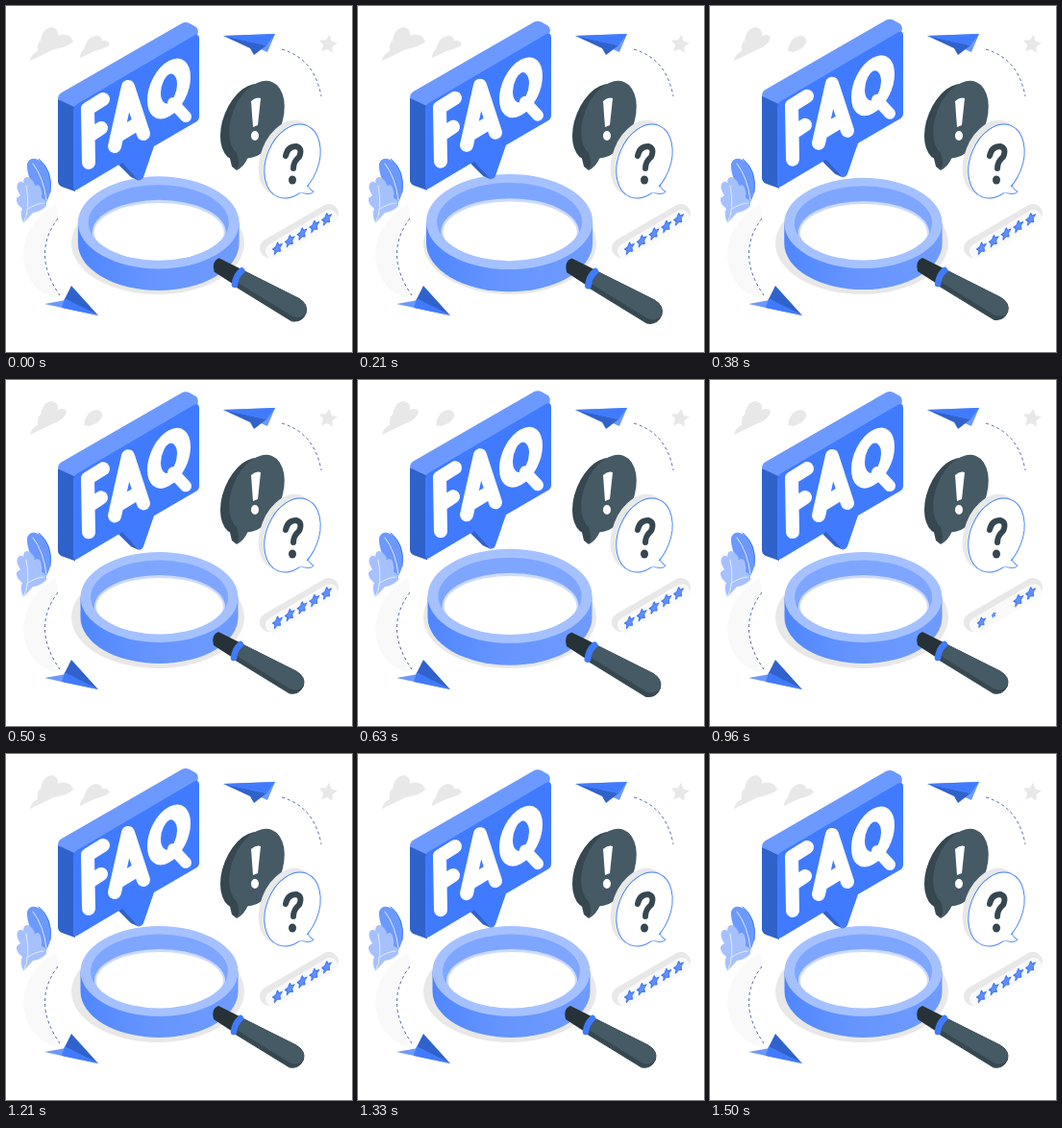
An HTML page for the animation above (1540 ms loop, 360 by 360 pixels).

```html
<!DOCTYPE html>
<html lang="en">
<head>
<meta charset="utf-8">
<title>FAQ</title>
<style>
html, body { margin: 0; width: 100%; height: 100%; overflow: hidden; background: #fff }
svg { display: block; width: 100vw; height: 100vh }
.blue { fill: #407bff } .light { fill: #6c99ff } .deep { fill: #3062cc }
.pale { fill: #a5c1ff } .gray { fill: #e8e8e8 } .white { fill: #fff }
.slate { fill: #455a64 } .dark { fill: #37474f } .ink { fill: #263238 }
.line { fill: none; stroke-linecap: round; stroke-linejoin: round }
.dash { fill: none; stroke: #3d5590; stroke-width: .9; stroke-dasharray: 3 3 }
</style>
</head>
<body>
<svg viewBox="0 0 360 360">
  <defs>
    <clipPath id="rim"><ellipse cx="159.5" cy="226" rx="71.5" ry="38.5"/></clipPath>
    <linearGradient id="wall">
      <stop stop-color="#4f86ff"/><stop offset=".45" stop-color="#6695ff"/><stop offset="1" stop-color="#6f9bff"/>
    </linearGradient>
  </defs>

  <!-- clouds and backdrop star -->
  <g class="gray">
    <path d="M25 57Q26 50 33 47Q32 39 36 36Q38 23 48 22Q55 24 54 31Q61 28 63 33Q61 41 50 45Z"/>
    <path d="M81 47Q83 33 93 31Q101 31 100 38Q97 45 87 48Z"/>
    <g id="tails">
      <path d="M54 31Q66 27 70 37Q66 42 50 45Z"/>
      <path d="M77 54Q77 48 82 44L99 36Q106 35 108 40Q104 44 94 46Z"/>
    </g>
    <path id="badge"/>
  </g>

  <!-- paper planes -->
  <path d="M52 206Q18 226 18 262Q22 295 50 304L56 301Q26 258 54 221Z" fill="#f9f9f9"/>
  <path class="dash" d="M287 45Q321 55 328 94M54 221Q26 258 56 301"/>
  <path class="light" d="M226 31L280 29L272 48L258 42Z"/>
  <path class="deep" d="M226 31L271 41L258 51L254 44Z"/>
  <path class="blue" d="M226 31L280 29L271 41Z"/>
  <path class="light" d="M96 322L62 306L40 310Z"/>
  <path class="deep" d="M96 322L68 291L61 305Z"/>
  <path class="blue" d="M96 322L61 304L58 314Z"/>

  <!-- leaves -->
  <path class="light" d="M42 204C30 196 21 176 22 164C25 155 36 158 42 168C49 180 48 194 42 204Z"/>
  <path class="line" d="M42 202Q39 178 28 164" stroke="#dbe6ff"/>
  <path class="line" d="M34 159Q49 171 46 194" stroke="#407bff"/>
  <path class="pale" d="M18 226Q14 216 17 211Q10 206 11 200L15 197Q10 190 12 185Q15 181 18 184Q18 177 23 178Q29 181 30 187Q34 184 36 189Q38 195 37 200Q43 201 42 208Q36 214 28 215Z"/>
  <path class="line" d="M18 226Q26 212 21 187M23 211Q30 206 39 205" stroke="#e4ecff"/>

  <!-- exclamation bubble -->
  <path class="dark" d="M231 150L235 167L240 171L249 157Z"/>
  <ellipse class="dark" rx="25" ry="42" transform="translate(251 121) rotate(22)"/>
  <ellipse class="slate" rx="26" ry="42" transform="translate(261 118) rotate(22)"/>
  <path class="slate" d="M239 151Q245 164 240 171Q248 167 252 157Z"/>
  <path class="white" d="M255 99Q260 94 265 96L262 124L257 126Z"/>
  <ellipse class="white" cx="259" cy="135" rx="4" ry="5"/>

  <!-- question bubble -->
  <ellipse class="gray" rx="27" ry="41" transform="translate(292 158) rotate(22)"/>
  <g class="white" stroke="#407bff" stroke-width=".9">
    <path d="M304 193Q317 198 320 193Q313 190 314 181Z"/>
    <ellipse rx="27" ry="40" transform="translate(298 161.5) rotate(22)"/>
  </g>
  <path class="white" d="M301 194Q314 195 317 193Q311 189 312 180Z"/>
  <path class="line" d="M291 156Q293 146 302 146Q309 148 305 157Q299 162 299 169" stroke="#37474f" stroke-width="6"/>
  <ellipse class="dark" cx="298" cy="181" rx="4" ry="4.5"/>

  <!-- rating -->
  <path class="line" d="M274 252L336 216" stroke="#e8e8e8" stroke-width="20"/>
  <path class="line" d="M278 255L337 220" stroke="#fafafa" stroke-width="16"/>
  <g id="rating" stroke-linejoin="round"></g>

  <!-- magnifier -->
  <ellipse class="gray" cx="158" cy="247" rx="90" ry="53"/>
  <g id="lens">
    <path fill="url(#wall)" d="M77.5 226V247A82 48 0 0 0 241.5 247V226Z"/>
    <ellipse class="pale" cx="159.5" cy="226" rx="82" ry="47"/>
    <g clip-path="url(#rim)">
      <rect x="80" y="180" width="160" height="90" fill="#7fa6ff"/>
      <ellipse cx="160" cy="236" rx="68" ry="33" fill="#cbdaff"/>
      <ellipse class="white" cx="160" cy="236" rx="66" ry="30"/>
    </g>
    <path class="ink" d="M221 262L243 273L236 289L216 276Q213 265 221 262Z"/>
    <path class="dark" stroke="#37474f" d="M246 275L302 303Q312 309 309.5 318Q305 328 295 326L238 291Z"/>
    <path class="slate" d="M246 275L302 303Q312 309 309.5 318Q304 325 295 321L240 287Z"/>
    <path class="line" d="M244 275Q238 280 237 289" stroke="#407bff" stroke-width="6.5"/>
  </g>

  <!-- FAQ board -->
  <g id="board" role="img" aria-label="FAQ">
    <path class="deep" d="M54 97L72 102V193L58 188Q54 186 54 182ZM117 165L121 162L139 182L130 178Z"/>
    <path class="light" d="M54 97Q54 92 58 90L183 18Q187 16 191 18L198 22Q201 25 199 31L71 105Z"/>
    <path class="blue" d="M70 109Q70 105 74 102L195 31Q201 28 201 34V115Q201 119 197 121L154 146L143 178Q140 184 136 179L121 163L74 191Q70 193 70 189Z"/>
    <g class="line" stroke="#fff" stroke-width="14">
      <path d="M101 97L85 107L86 163M87 135L99 127"/>
      <path d="M113 146L127 84L143 133M118 134L136 123"/>
      <ellipse rx="15.5" ry="22" transform="translate(169.5 86) skewY(-28)"/>
      <path d="M174 101L187 115" stroke-width="12"/>
    </g>
  </g>
</svg>
<script>
const LOOP = 1540, LEAD = 25;
const $ = id => document.getElementById(id);
const clamp = x => Math.min(1, Math.max(0, x));

function starPath(radius) {
  const points = Array.from({ length: 10 }, (_, i) => {
    const r = i % 2 ? radius * .5 : radius, a = i * Math.PI / 5;
    return [r * Math.sin(a), -r * Math.cos(a)].map(v => v.toFixed(2));
  });
  return `M${points.join('L')}Z`;
}

// CSS "ease": cubic-bezier(.25, .1, .25, 1)
function ease(x) {
  const bezier = (a, b, u) => 3 * a * u * (1 - u) ** 2 + 3 * b * u * u * (1 - u) + u ** 3;
  let low = 0, high = 1;
  for (let i = 0; i < 20; i++) {
    const mid = (low + high) / 2;
    if (bezier(.25, .25, mid) < x) low = mid; else high = mid;
  }
  return bezier(.1, 1, low);
}

// Two beats: a slow release, a rest, then a quick release
function heartbeat(p) {
  const step = (from, to) => ease(clamp((p - from) / (to - from)));
  return 1 + .1 * (step(0, .1) - step(.1, .3) + step(.4, .5) - step(.5, .6));
}

$('badge').setAttribute('d', starPath(10));
$('badge').setAttribute('transform', 'translate(335 40) rotate(8)');
const shape = starPath(6);
$('rating').innerHTML = Array.from({ length: 5 }, () =>
  `<g><path d="${shape}" transform="translate(-1.2 -.6)" class="pale"/>
   <path d="${shape}" fill="#5f90ff" stroke="#3f74ee"/></g>`).join('');
const stars = [...$('rating').children];

function draw(now) {
  const t = now % LOOP, phase = (t + LEAD) % LOOP / LOOP;
  const lift = 6 * Math.sin(Math.PI * phase) ** 2;
  $('board').setAttribute('transform', `translate(0 ${-lift})`);
  $('lens').setAttribute('transform',
    `translate(194 253) scale(${heartbeat(phase)}) translate(-194 -253)`);
  $('tails').setAttribute('visibility', t > 300 && t < 1100 ? 'hidden' : 'visible');
  stars.forEach((star, i) => {
    const since = t - 840 - 58 * i;
    const size = since < 0 ? 1 : clamp(since / 140);
    star.setAttribute('transform',
      `translate(${282.5 + 12.8 * i} ${252 - 7.6 * i}) skewY(-30) scale(${.87 * size} ${size})`);
  });
}

const start = performance.now();
function tick(now) {
  draw(Math.max(0, now - start));
  requestAnimationFrame(tick);
}
draw(0);
requestAnimationFrame(tick);
</script>
</body>
</html>
```
